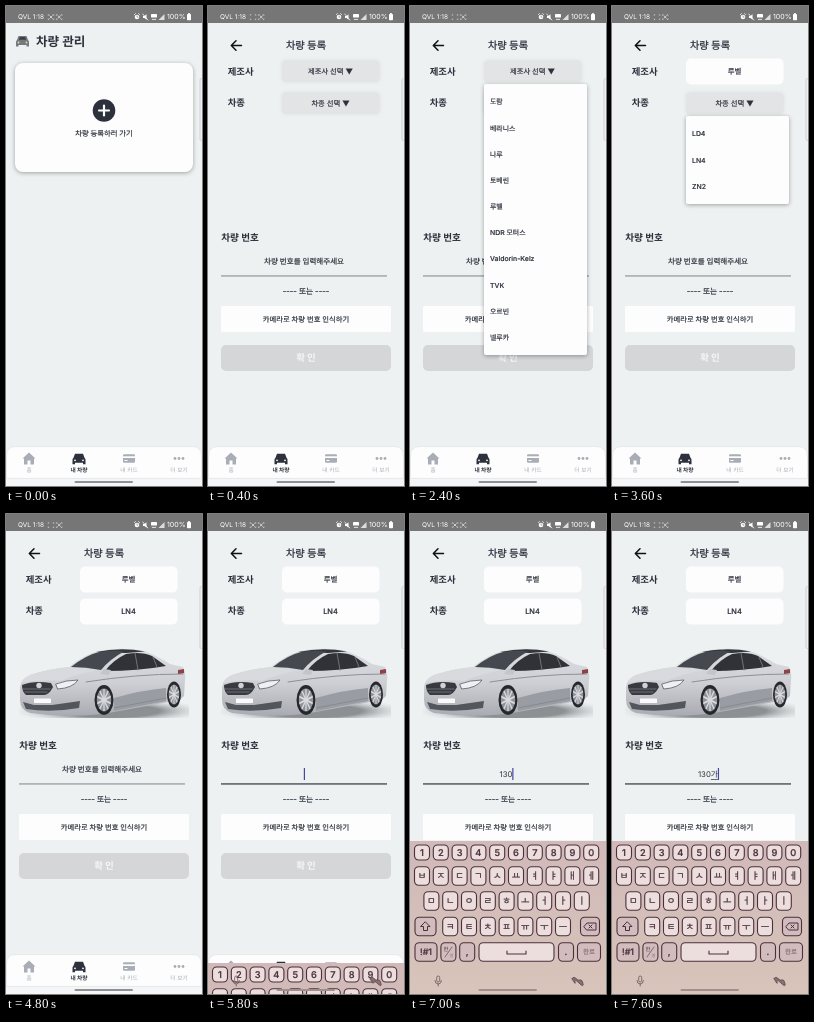
An HTML page for the animation above (8000 ms loop, 196 by 480 pixels).

```html
<!DOCTYPE html>
<html lang="ko">
<head>
<meta charset="utf-8">
<title>차량 등록</title>
<style>
  html, body { margin: 0; width: 100%; height: 100%; overflow: hidden; background: #edf1f2; }
  svg { display: block; width: 196px; height: 480px; }
  text { font-family: Inter, "Noto Sans CJK KR", "Noto Sans CJK", sans-serif; text-rendering: geometricPrecision; }
  .raised { filter: drop-shadow(0 1px 2px #0005); }
  .soft { filter: drop-shadow(0 0 2px #0001); }
</style>
</head>
<body>
<svg id="stage" viewBox="0 0 196 480"></svg>
<script>
const LOOP = 8000, STEP = 200;
const INK = '#2c313c', MUTED = '#a9adb6', KEY_INK = '#4b303d', PAPER = '#fdfdfd';

// Weight 500 is thickened with a thin outline, as the Korean font may lack a medium cut.
const text = (s, x, cy, size, { weight = 400, fill = INK, anchor = 'middle' } = {}) =>
  `<text x="${x}" y="${cy + size * .36}" font-size="${size}" font-weight="${weight}" fill="${fill}" text-anchor="${anchor}"` +
  (weight === 500 ? ` stroke="${fill}" stroke-width="${size * .025}"` : '') + `>${s}</text>`;
const left = (s, x, cy, size, weight = 400) => text(s, x, cy, size, { weight, anchor: 'start' });
const rect = (x, y, w, h, fill, r = 0, extra = '') =>
  `<rect x="${x}" y="${y}" width="${w}" height="${h}" rx="${r}" fill="${fill}" ${extra}/>`;
const path = (d, fill = 'none', stroke = 'none', width = 1) =>
  `<path d="${d}" fill="${fill}" stroke="${stroke}" stroke-width="${width}" stroke-linecap="round" stroke-linejoin="round"/>`;
const circle = (x, y, r, fill) => `<circle cx="${x}" cy="${y}" r="${r}" fill="${fill}"/>`;
const group = (id, ...parts) => `<g id="${id}">${parts.join('')}</g>`;
const gradient = (id, ...colors) => `<linearGradient id="${id}" x2="0" y2="1">` +
  colors.map((c, i) => `<stop offset="${i / (colors.length - 1)}" stop-color="${c}"/>`).join('') + '</linearGradient>';

const defs = `<defs>${gradient('paint', '#dcdde1', '#cfd0d5', '#a9abb2')}${gradient('board', '#d0b9b8', '#d8c4ba')}
  <radialGradient id="shade"><stop offset=".5" stop-color="#8d9093"/><stop offset="1" stop-color="#dfe2e4" stop-opacity="0"/></radialGradient>
  <clipPath id="photo"><rect x="13" y="134" width="170" height="70"/></clipPath></defs>`;

const carIcon = (x, y, body, light) => `<g transform="translate(${x} ${y})">
  ${path('M-4-5H4L5.5-1Q6.5 0 6.5 1V5.5H4V4H-4V5.5H-6.5V1Q-6.5 0-5.5-1Z', body)}
  ${circle(-4, 1.5, .9, light)}${circle(4, 1.5, .9, light)}</g>`;

function statusBar() {
  const brackets = x => path(`M${x} 9.3v-.6h.6m4.4 0h.6v.6m0 3.6v.6h-.6m-4.4 0h-.6v-.6`, 'none', '#d8d8d8', .7);
  const cross = x => path(`M${x} 9.7l2.6 2.6m0-2.6l-2.6 2.6`, 'none', '#f4f4f4', .7);
  return rect(0, 0, 196, 17, '#767676') +
    text('QVL 1:18', 12, 10.5, 6.5, { fill: '#fff', anchor: 'start' }) +
    brackets(42.2) + brackets(50.4) + cross(51.9) + group('blink', cross(43.7)) +
    circle(131, 11, 2.3, '#fff') + path('M128.4 8.6l1-1m3.2 0l1 1', 'none', '#fff', .8) +
    path('M131 9.8v1.4h1', 'none', '#767676', .6) +
    path('M137 10h1.5l2-1.8v5.6l-2-1.8h-1.5Z', '#fff') + path('M136.8 8l5 6', 'none', '#fff', .8) +
    rect(145, 8, 6, 3.6, '#fff', .7) + path('M146.3 13.4h3.4', 'none', '#fff', .8) +
    path('M152.5 14L158.5 8V14Z', '#ddd') +
    text('100%', 161, 10.5, 7, { fill: '#fff', anchor: 'start' }) +
    rect(181, 8, 4, 6.3, '#fff', .8) + rect(182, 7.2, 2, 1, '#fff');
}

function navBar() {
  const label = (s, x, fill = MUTED, weight = 400) => text(s, x, 464, 5.7, { fill, weight });
  return rect(0, 460, 196, 20, '#f4f5f6') +
    path('M.5 472V450Q.5 440.5 10 440.5H186Q195.5 440.5 195.5 450V472Z', PAPER, '#e1e4e7', .7) +
    path('M16.5 452.5L23 446.5L29.5 452.5H28V458.5H24.5V454.5H21.5V458.5H18V452.5Z', MUTED) +
    carIcon(73, 452.8, INK, '#fff') +
    rect(117, 448.3, 12, 8.5, MUTED, 1.2) + rect(117, 450.3, 12, 1.7, '#fff') + rect(118.5, 454, 3, 1, '#fff') +
    [169, 173, 177].map(x => circle(x, 452.5, 1.4, MUTED)).join('') +
    label('홈', 23) + label('내 차량', 73, INK, 700) + label('내 카드', 123) + label('더 보기', 173) +
    rect(68.5, 475, 58.5, 2, '#8d8f92', 1);
}

const home = () =>
  carIcon(16.5, 35, '#747980', '#f4d58a') + path('M12.8 33.8L14 31h5l1.2 2.8Z', '#3a3f48') +
  left('차량 관리', 30, 35, 12.6, 700) +
  rect(9, 57, 178, 109, PAPER, 8, 'class="raised"') +
  circle(98, 104.5, 11.3, INK) + path('M98 99.5v10m-5-5h10', 'none', '#fff', 2.2) +
  text('차량 등록하러 가기', 98, 127, 7.3, { weight: 500 });

const picker = (id, label, y) => group(id,
  rect(74, y - 11, 97.5, 21.5, '#e2e4e6', 4, 'class="soft"'), text(label + ' ▼', 122.5, y, 7.3, { weight: 500 }));
const chosen = (id, label, y) => group(id,
  rect(74, y - 13, 97.5, 26, PAPER, 5), text(label, 122.5, y, 7.4, { weight: 500 }));
const menu = (id, y, height, items) => group(id,
  rect(74, y, 103, height, PAPER, 2, 'class="raised"'),
  ...items.map((s, i) => left(s, 80, y + 18 + i * 26.15, 6.9, 500)));

function sedan() {
  const wheel = (x, y, rx, ry) => `<g transform="translate(${x} ${y}) scale(${rx} ${ry})">` +
    circle(0, 0, 1, '#26282d') + circle(0, 0, .76, '#8f9299') +
    [...Array(10).keys()].map(i => `<path d="M0 0V-.74" stroke="#d9dbdf" stroke-width=".13" transform="rotate(${i * 36})"/>`).join('') + '</g>';
  return group('sedan', '<g clip-path="url(#photo)">',
    '<ellipse cx="104" cy="197" rx="100" ry="13" fill="url(#shade)"/>',
    path('M14 173Q15 165 24 161Q42 155 63 153Q78 141 92 137Q115 132.5 138 137Q152 142 164 150L177 153Q180 158 179 166L178 182Q174 187 162 188L108 198Q70 205 24 199Q14 196 14 186Z', 'url(#paint)'),
    path('M24 161Q42 155 63 153L92 156Q70 160 54 167Q34 165 15 169Q17 164 24 161Z', '#d9dade'),
    path('M90 138Q115 133 139 137.5L120 139Z', '#34363c'),
    path('M65 153Q80 141 93 138Q108 136 118 137.5Q104 145 95 156Q80 153 65 153Z', '#45484e'),
    path('M99 157Q107 146 120 140Q136 137.5 146 142L160 152Q132 157 99 157Z', '#303238'),
    path('M129 139L132 156M147 143L151 153', 'none', '#777b81', .9),
    path('M108 184Q136 176 160 174L160 187L108 197Z', '#9a9ca4'),
    path('M80 168Q130 160 177 160M108 194L160 184', 'none', '#85888f', .9),
    path('M94 160l4-5 7 1-2 5Z', '#c3c5ca'),
    path('M16 171Q28 166 45 169L47 173Q43 181 38 181H20Q16 178 16 171Z', '#383a40'),
    path('M17 175H44M19 178H41', 'none', '#8f9298', .6),
    circle(33, 171.5, 2.7, '#d0d2d6'),
    path('M50 170Q60 166 72 166Q67 174 52 175Z', '#eef0f4', '#5b5e66', .8),
    path('M17 188L28 191H46L74 187L73 194Q44 199 20 195Z', '#54565d'),
    rect(28, 184.5, 17, 4.5, '#fafafa', .5),
    path('M172 156l6-1v4l-6 1Z', '#8d4247'),
    wheel(98, 186, 9.5, 15), wheel(168, 180.5, 7, 13), '</g>');
}

const form = () =>
  path('M33.5 39.5H23.5M28 34.8L23.3 39.5L28 44.2', 'none', '#111', 1.5) +
  text('차량 등록', 98, 39.5, 10.2, { weight: 500 }) +
  left('제조사', 19.7, 65.5, 9.4, 700) + left('차종', 19.7, 97, 9.4, 700) +
  picker('makerPicker', '제조사 선택', 65.5) + chosen('maker', '루벨', 65.5) +
  picker('modelPicker', '차종 선택', 97.5) + chosen('model', 'LN4', 97.5) +
  sedan() +
  left('차량 번호', 13.3, 231.7, 9.6, 700) +
  group('hint', text('차량 번호를 입력해주세요', 96, 255, 7.5, { weight: 500 })) +
  `<text id="plate" x="96" y="262.8" font-size="7.8" text-anchor="middle" fill="${INK}"></text>` +
  rect(0, 265.3, 7, .7, INK, 0, 'id="composing"') +
  rect(0, 254, 1.2, 12, '#4547a0', 0, 'id="caret"') +
  rect(13, 269.4, 166, 1.1, '#8a8e94', 0, 'id="line"') +
  text('---- 또는 ----', 98, 285, 7.7, { weight: 500 }) +
  rect(13, 300, 170, 26, PAPER, 1) + text('카메라로 차량 번호 인식하기', 98, 313, 7.3, { weight: 500 }) +
  rect(13, 339, 170, 26, '#d5d6d8', 5) + text('확 인', 98, 352, 9.5, { weight: 700, fill: '#f6f6f6' }) +
  menu('makerMenu', 78, 271, ['도람', '베라니스', '나루', '토베린', '루벨', 'NDR 모터스', 'Valdorin-Kelz', 'TVK', '오르빈', '넬루카']) +
  menu('modelMenu', 110, 88, ['LD4', 'LN4', 'ZN2']);

function keyboard() {
  const key = (label, x, y, { w = 15, h = 18.5, size = 9.3, fill = '#ecdedd', ink = KEY_INK } = {}) =>
    rect(x - w / 2, y - h / 2, w, h, fill, 4.2, `stroke="${KEY_INK}" stroke-width="1.1"`) +
    text(label, x, y, size, { fill: ink, weight: 500 });
  const row = (letters, x, y, h) => [...letters].map((c, i) => key(c, x + i * 18.8, y, { h })).join('');
  const fill = '#d3bcbd';
  const keys = row('1234567890', 12, 338.5, 15) + row('ㅂㅈㄷㄱㅅㅛㅕㅑㅐㅔ', 12, 362) +
    row('ㅁㄴㅇㄹㅎㅗㅓㅏㅣ', 21.4, 387) + row('ㅋㅌㅊㅍㅠㅜㅡ', 40.2, 412.5) +
    key('', 15.5, 412.5, { w: 21, fill }) + path('M15.5 408L20 412.5H17.5V416.5H13.5V412.5H11Z', 'none', KEY_INK, 1) +
    key('', 180, 412.5, { w: 19, fill }) + path('M174 412.5l3-3.5h9v7h-9Zm5-1.5l3 3m0-3l-3 3', 'none', KEY_INK, 1) +
    key('!#1', 16, 438, { w: 22, size: 8.8, fill }) + key('', 38.4, 438, { fill }) +
    text('한', 36, 435.5, 5.2, { fill: KEY_INK }) + text('영', 41.5, 441.5, 4.2, { fill: '#8b7076' }) +
    path('M35 443L42 433', 'none', KEY_INK, .6) + key(',', 57.2, 438, { fill }) +
    key('', 106.5, 438, { w: 75 }) + path('M97 437v3h19v-3', 'none', KEY_INK, 1.1) +
    key('.', 156, 438, { fill }) + key('완료', 179, 438, { w: 23, size: 6.5, fill, ink: '#8b7076' });
  return group('keyboard', group('keys', rect(0, 327, 196, 153, 'url(#board)'), keys)) +
    group('keyboardTools',
      rect(26.7, 462, 3, 6, 'none', 1.5, 'stroke="#6d5459" stroke-width=".8"') +
      path('M25 466.5q0 3.5 3.2 3.5t3.2-3.5m-3.2 3.5v2', 'none', '#6d5459', .8),
      path('M162 464.5q2-2.5 4 0t4 1.5 3 3.5-4-.5-4-1-3-3.5', '#8b7076', '#6d5459', 1),
      rect(68.5, 475, 58.5, 2, '#a18f8e', 1));
}

stage.innerHTML = defs + rect(0, 0, 196, 480, '#edf1f2') + group('home', home()) + group('form', form()) +
  navBar() + keyboard() + statusBar() +
  rect(194, 72.5, 6, 62, '#eef0f1', 1.5, 'stroke="#c3c7c9" stroke-width=".8"');

const el = id => document.getElementById(id);
const show = (id, on) => el(id).style.display = on ? '' : 'none';
const typed = [[6600, '1'], [6800, '13'], [7000, '130'], [7200, '130ㄱ'], [7600, '130가']];

function render(now) {
  const t = Math.floor(now % LOOP / STEP) * STEP;
  const within = (from, to = LOOP) => t >= from && t < to;
  const focused = within(5800);

  show('blink', t % 1000 < 400 || within(5800, 6000));
  show('home', within(0, 200));
  show('form', within(200));
  show('makerPicker', within(0, 3200));
  show('makerMenu', within(1600, 3200));
  show('maker', within(3200));
  show('modelPicker', within(0, 4800));
  show('modelMenu', within(3600, 4800));
  show('model', within(4800));
  show('sedan', within(4800));
  show('hint', !focused);
  show('keyboard', focused);
  show('keyboardTools', focused);
  el('keys').setAttribute('transform', `translate(0 ${within(5800, 6000) ? 122 : 0})`);
  el('line').setAttribute('fill', focused ? '#20242c' : '#8a8e94');

  const value = (typed.findLast(([at]) => t >= at) || [0, ''])[1];
  el('plate').textContent = value;
  const end = 96 + (value ? el('plate').getComputedTextLength() / 2 : 0);
  el('caret').setAttribute('x', end - .2);
  show('caret', focused && !within(6200, 6400));
  el('composing').setAttribute('x', end - 7.2);
  show('composing', value.length === 4);
}

function tick() {
  render(performance.now());
  requestAnimationFrame(tick);
}
tick();
</script>
</body>
</html>
```
